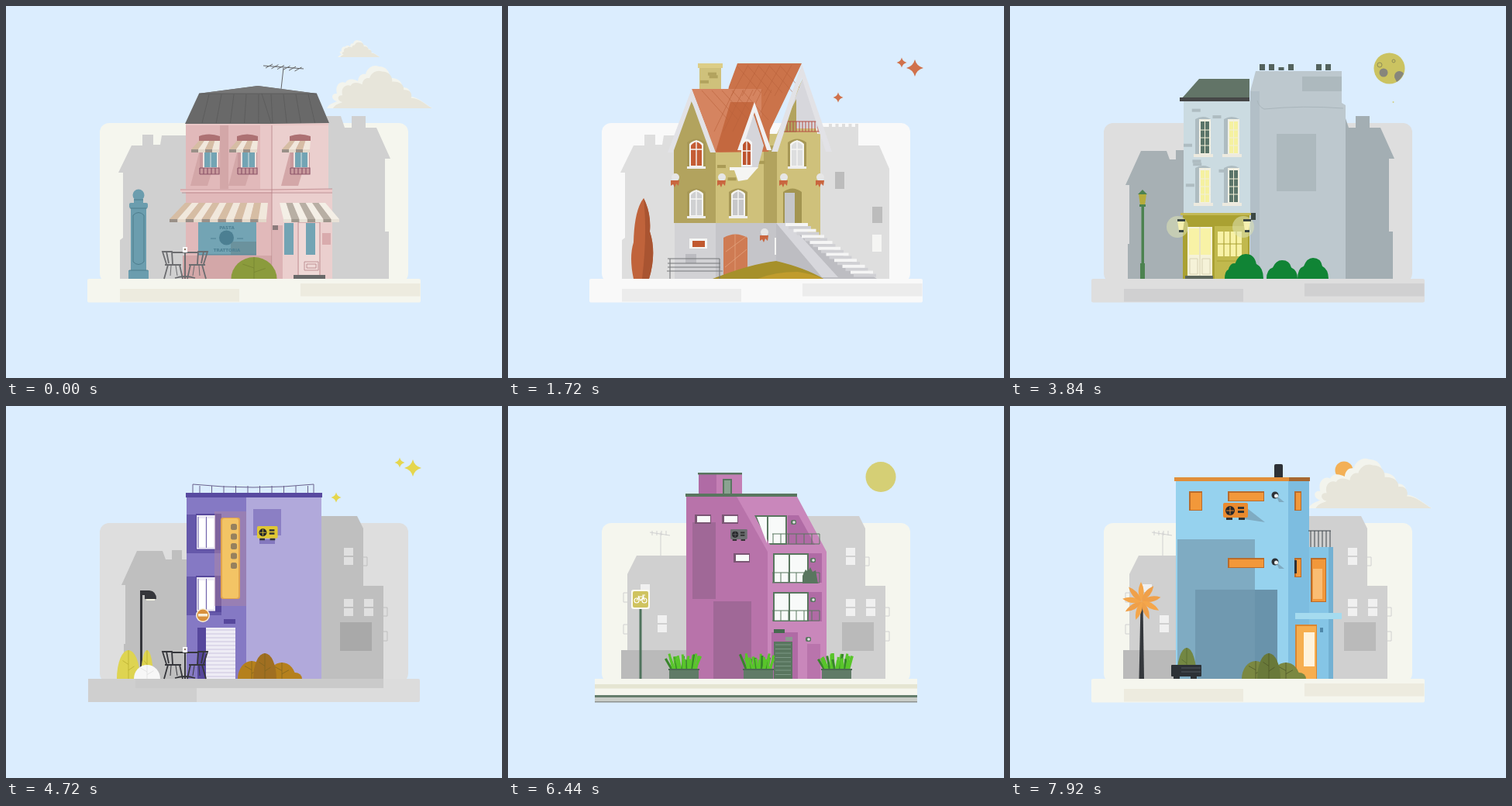
An HTML page for the animation above (8000 ms loop, 640 by 480 pixels).

```html
<!DOCTYPE html>
<html lang="en">
<head>
<meta charset="utf-8">
<title>Little houses</title>
<style>
html, body { margin: 0; width: 100%; height: 100%; overflow: hidden; background: #dbedfe; }
svg { display: block; width: 100%; height: 100%; }
text { font: bold 5.5px "DejaVu Sans", sans-serif; text-anchor: middle; }
</style>
</head>
<body>
<svg id="stage" viewBox="0 0 640 480"></svg>
<script>
const LOOP = 8000, HOLD = 1500, FIRST_CUT = 1550, FLOOR = 352;

// shapes
const R = (f, x, y, w, h, r = 0) => `<rect x="${x}" y="${y}" width="${w}" height="${h}" rx="${r}" fill="${f}"/>`;
const D = (f, d) => `<path fill="${f}" d="${d}"/>`;
const L = (c, w, d) => `<path fill="none" stroke="${c}" stroke-width="${w}" d="${d}"/>`;
const C = (f, x, y, r) => `<circle fill="${f}" cx="${x}" cy="${y}" r="${r}"/>`;
const T = (t, s) => `<g transform="${t}">${s}</g>`;
const stand = (f, x, w, y) => R(f, x, y, w, FLOOR - y);

// repetition
const rep = (n, fn) => Array.from({ length: n }, (_, i) => fn(i)).join('');
const each = (list, fn) => list.map(fn).join('');
const grid = (nx, ny, x, y, dx, dy, fn) => rep(nx, i => rep(ny, j => fn(x + i * dx, y + j * dy)));
const bars = (n, x, dx, y, h) => rep(n, i => `M${x + i * dx} ${y}v${h}`);
const rows = (n, y, dy, x, w) => rep(n, i => `M${x} ${y + i * dy}h${w}`);
const mirror = (x, s) => s + T(`translate(${2 * x} 0) scale(-1 1)`, s);
function seeded(seed) {
  return () => (seed = seed * 16807 % 2147483647) / 2147483647;
}
function bricks(f, seed, n, x, y, w, h) {
  const rnd = seeded(seed);
  return rep(n, () => R(f, x + rnd() * (w - 11), y + rnd() * (h - 4), 11, 4));
}

// scenery
const panel = f => R(f, 121, 151, 398, 206, 12);
const ground = (f, block) => R(f, 105, FLOOR, 430, 30.5, 2) + R(block, 147, 365, 154, 16.5) + R(block, 380, 358, 154.5, 16.5);
const leftGables = f => D(f, 'M147 352v-50l4-3v-84h-6l17-35h14v-14h14v13h9l2-12h35v185Z');
const leftRoof = f => D(f, 'M152 352v-45h2v-76h-5l20-44h33l4 11h8v-12h13v12h9v154Z');
const rightGables = f => D(f, 'M408 352v-210h24l5 15h9v-15h18v15h14l18 40h-7v94h5v61Z');
const flats = (wall, light, dark, left) => D(wall, 'M385 352v-210h68l8 16v74h26v120Z') + R(dark, 431, 279, 41, 37)
  + grid(1, 2, 436, 183, 0, 12, (x, y) => R(light, x, y, 12, 10)) + grid(2, 2, 436, 249, 26, 12, (x, y) => R(light, x, y, 12, 10))
  + L(wall, 1, 'M461 195h5v11h-5M487 260h5v11h-5M487 291h5v12h-5')
  + (left ? D(wall, 'M146 352l8-37v-98l12-24h69v159Z') + stand(dark, 146, 84, 315) + R(light, 171, 230, 12, 10)
    + grid(1, 2, 193, 270, 0, 12, (x, y) => R(light, x, y, 12, 10)) + L(wall, 1, 'M154 241h-5v12h5M154 282h-5v12h5M197 193v-30M183 163l26 4' + bars(4, 186, 6, 161, 6)) : '');

function cloud(x, y, s) {
  const puff = 'M0 0C3-6 9-7 13-9C5-11 5-20 13-19C10-29 17-36 24-33C28-40 36-37 40-35C41-43 46-45 50-44C52-52 60-57 67-54C78-54 82-45 81-39C91-40 98-34 97-27C107-28 109-20 107-15C116-16 128-5 136 0Z';
  return T(`translate(${x} ${y}) scale(${s})`, D('#f3f4ed', puff) + T('translate(8 0) scale(.94 .88)', D('#e7e5da', puff)));
}
const star = (f, x, y, r) => D(f, `M${x} ${y - r}q${r * .2} ${r * .8} ${r} ${r}q${-r * .8} ${r * .2} ${-r} ${r}q${-r * .2} ${-r * .8} ${-r} ${-r}q${r * .8} ${-r * .2} ${r} ${-r}Z`);
const stars = f => star(f, 525, 80, 11) + star(f, 508, 73, 6.5) + star(f, 426, 118, 6.5);

// plants and props
const dome = (f, x, w, h) => D(f, `M${x - w} ${FLOOR}a${w} ${h} 0 0 1 ${2 * w} 0Z`);
const leafy = (f, vein, x, w, h) => dome(f, x, w, h) + L(vein, .7, `M${x} ${FLOOR}v${-h}M${x} ${FLOOR - h * .3}l${w / 2} -5M${x} ${FLOOR - h * .5}l${-w / 2} -5`);
const shrubs = (f, tall, vein) => leafy(f, vein, 317, 18, 23) + dome(f, 373, 9, 8) + leafy(f, vein, 356, 18, 21) + leafy(tall, vein, 334, 15, 33);
const cafe = c => mirror(231, L(c, 1.8, 'M207 333l-5-16h12l1 16M207 317l3 15M205 334h21M209 334l-5 18M224 334l4 18') + L(c, 1, 'M213 335l-1 13M219 335l2 13'))
  + R(c, 215, 317, 32, 2) + stand(c, 230, 2, 318) + L(c, 1.8, 'M218 351q13-4 26 0') + R('#fff', 228, 311, 6, 7) + C('#876', 231, 314, 1.2);
const aircon = (x, y, s, f) => T(`translate(${x} ${y}) scale(${s})`, R(f, 0, 0, 32, 19, 2) + C('#26272a', 9, 10, 6) + L(f, 1, 'M9 5v10M4 10h10')
  + grid(1, 2, 19, 5, 0, 5, (a, b) => R('#333', a, b, 8, 3)) + grid(2, 1, 4, 19, 16, 0, (a, b) => R('#333', a, b, 8, 3)));

// striped canopy: top edge a..b at y, bottom edge c..d at z, with a hanging valance
const awning = (a, b, y, c, d, z, n, slope, edge) => rep(n, i => {
  const mix = (p, q, k) => p + (q - p) * k / n;
  const l = mix(c, d, i), r = mix(c, d, i + 1);
  return D(slope[i % 2], `M${mix(a, b, i)} ${y}H${mix(a, b, i + 1)}L${r} ${z}H${l}Z`) + R(edge[i % 2], l, z, r - l, 4);
});

function pinkShop() {
  const shade = '#d3a7a8', line = '#b58287', glass = '#73a4b4', ink = '#4c7f92', teal = '#6b9dae';
  const stripe = ['#d6bda4', '#f1e8dc'], edge = ['#9a9088', '#e4d8ca'];
  const upper = x => D('#ad7173', `M${x - 1} 174v-6q13-5 27 0v6Z`) + R('#c99a9d', x, 174, 25, 43) + R('#efe3e0', x + 4, 187, 20, 22)
    + R(glass, x + 6, 188, 16, 20) + L('#dce3e3', 1, `M${x + 14} 188v20`) + L('#8d5569', 1.2, `M${x} 209h25v8h-25` + bars(5, x, 5, 209, 8))
    + awning(x - 1, x + 26, 174, x - 11, x + 25, 185, 4, stripe, edge);
  return panel('#f5f6ee') + leftGables('#d0d0d0') + rightGables('#d0d0d0') + ground('#f5f6ee', '#edebdf')
    + cloud(414, 132, 1) + T('translate(0 39)', cloud(428, 27, .4))
    + stand('#e1b9ba', 232, 111, 151) + stand('#ebcfce', 343, 73, 151) + stand('#ebcfce', 343, 78, 239) + R(shade, 276, 152, 11, 84) + R('#e9c8c8', 328, 152, 15, 84)
    + each([250, 299, 367], x => D(shade, `M${x} 186l-12 46h22l14-46Z`)) + stand(shade, 228, 115, 322) + stand('#dcb3b5', 344, 13, 283) + R('#d9abad', 408, 293, 11, 15) + R('#8b7a7b', 344, 283, 7, 6)
    + R('#ecc9c9', 225, 236, 196, 4) + L(line, .8, 'M225 237h118l78-1M227 241h194M343 152v200')
    + D('#696969', 'M231 152l18-39l76-10l76 10l16 38l-75 1Z') + D('#767676', 'M249 113l76-10l76 10Z') + L('#585858', .7, 'M249 113h152M330 113l12 38' + rep(9, i => `M${262 + i * 16} 114l${i * 2.2 - 9} 37`)) + L('#e9c7c6', 2, 'M232 153h184')
    + L('#666', 1, 'M355 107l3-27M332 77l52 4' + rep(6, i => `M${335 + i * 7.5} ${80 + i * .8}l9-5`))
    + each([250, 299, 367], upper)
    + R(glass, 248, 279, 75, 42) + R('#6b929d', 290, 304, 33, 17) + C(ink, 284.5, 299, 9.5) + L(ink, 1, 'M264 300h7M298 300h8M248 321h75')
    + `<g fill="${ink}"><text x="285" y="288">PASTA</text><text x="285" y="317">TRATTORIA</text></g>`
    + stand('#efd9d7', 378, 26, 280) + grid(2, 1, 359, 280, 28, 0, (x, y) => R(glass, x, y, 12, 41)) + L(line, .8, 'M377 352v-73h28v73M385 330h18v11h-18zM388 333h12v5h-12z') + stand('#696969', 371, 41, 347)
    + awning(231, 338, 254, 211, 336, 275, 12, stripe, edge) + awning(353, 412, 254, 358, 430, 275, 7, ['#f4efe6', '#b8afa4'], ['#e8e2d7', '#9f978d'])
    + C(teal, 171, 244, 7.5) + R(teal, 165, 249, 12, 5) + R(teal, 159, 254, 24, 7, 2) + stand(teal, 161, 20, 260) + stand(teal, 158, 26, 341) + L('#467485', .8, 'M164 270q7-7 14 0v60q-7 7-14 0zM160 261h22M159 341h24M165 250h12')
    + leafy('#8b9b3c', '#748130', 320, 29.5, 28) + cafe('#6c6d70');
}

function yellowHouse() {
  const wall = '#cfc17b', shade = '#b2a35e', roof = '#cb734a', trim = '#e2e2e6', white = '#f5f5f3';
  const arched = (f, x, y, w, h) => D(f, `M${x} ${y + h}v${5 - h}q${w / 2} -9 ${w} 0v${h - 5}Z`);
  const sash = (f, x, y) => arched('#a79856', x - 3, y - 2, 24, 36) + arched(white, x, y, 18, 35) + arched(f, x + 2, y + 2, 14, 31) + L(white, 1.4, `M${x + 9} ${y}v34M${x} ${y + 12}h18`) + R('#eee', x - 3, y + 34, 24, 3);
  const gable = (f, x, y, w, h, t) => D(f, `M${x} ${y}l${w} ${h}h${-t}L${x} ${y + t * 2.2}L${x - w + t} ${y + h}h${-t}Z`);
  const basket = (x, y) => C('#e6e6e6', x, y, 5) + D('#c9663f', `M${x - 6} ${y + 4}h11l-1 7l-3-3l-2 5l-2-4l-3 2Z`);
  return panel('#f9f9f9') + leftGables('#dedede') + D('#dedede', 'M400 352v-196h14v24h65l13 30v142Z') + R('#dedede', 414, 156, 38, 30) + L('#dedede', 4, bars(5, 416, 8.5, 152, 6))
    + R('#bcbcbc', 422, 214, 12, 22) + R('#bcbcbc', 470, 259, 13, 21) + R(white, 470, 295, 12, 22) + ground('#f9f9f9', '#ececec') + stars('#d0714b')
    + R(wall, 247, 76, 28, 36) + R('#dccd87', 245, 74, 32, 6) + bricks(shade, 5, 3, 248, 84, 26, 22)
    + D(shade, 'M214 280v-98l21-62l33 62v98Z') + stand(wall, 268, 135, 165) + D(wall, 'M340 180l41-88l22 88Z') + R(shade, 330, 180, 17, 100) + bricks('#aa9b55', 9, 5, 270, 192, 130, 75)
    + stand('#d2d2d5', 215, 53, 280) + stand('#c5c5c9', 268, 78, 280) + R('#bbbbc0', 229, 320, 14, 12)
    + D(roof, 'M296 74h83l-41 86l-2 28l-68 1l17-85Z') + D('#d58460', 'M237 107h90v36l-10-18l-21 59l-28 5Z') + D('#c4683f', 'M287 124h30l-21 64h-28Z')
    + L('#b9623c', .6, rep(5, i => `M${250 + i * 13} 109l34 38M${296 + i * 14} 78l30 34M${292 + i * 12} 108l-26 54M${310 + i * 14} 76l-22 40`))
    + D('#d7d7dc', 'M380 94l22 64h-47Z') + D(shade, 'M358 147l14-27v43h-18Z') + L('#b64c42', 1, 'M355 149h47M355 162h47' + bars(12, 356, 4, 149, 13))
    + gable(trim, 237, 107, 31, 82, 7) + gable(trim, 379, 75, 39, 113, 8)
    + stand('#d5d5da', 0, 0, FLOOR) + D('#d5d5da', 'M317 140l-16 43v27h21l8-30Z') + gable('#f0f0f2', 318, 124, 22, 62, 6) + D(white, 'M286 208h37l-14 16l-12 2l-5-14h-6Z')
    + arched('#f5f5f5', 301, 171, 14, 36) + arched('#bd532e', 303, 174, 10, 31) + L(white, 1.3, 'M308 172v34M302 187h12')
    + sash('#c55d35', 234, 173) + sash('#cfd0d2', 234, 237) + sash('#c6c6c8', 288, 237) + sash('#dddedf', 364, 173) + arched('#a39551', 355, 235, 24, 45) + R('#c5c6c9', 357, 241, 13, 39)
    + R(white, 234, 300, 23, 13) + R('#c1592f', 238, 303, 16, 8) + R(white, 344, 299, 11, 22) + R('#c1592f', 347, 302, 6, 17)
    + arched('#cf7b53', 278, 294, 31, 58) + L('#e2a47f', .8, 'M281 317l27-20M280 337l28-23M293 294v58') + each([216, 276, 356, 403], x => basket(x, 221)) + basket(331, 292)
    + D('#bdbdc2', 'M346 280h24l106 72H346Z') + D('#d7d7dc', 'M346 280h16l64 70h-21Z') + rep(9, i => R('#f5f5f5', 358 + i * 10.5, 280 + i * 7.7, 29, 4) + R('#d0d0d4', 362 + i * 10.5, 284 + i * 7.7, 29, 4))
    + D('#a6902a', 'M264 352q48-19 82-23q38 9 61 23Z') + D('#c09c2d', 'M322 352q22-9 52-9q20 3 33 9Z')
    + D('#c0633b', 'M162 352q-6-28 0-47q1-42 13-57q10 19 8 43q9 28-1 61Z') + D('#a95431', 'M175 248q10 20 8 43q9 28-1 61h-9q7-58 2-104')
    + L('#77787b', 1.1, rows(4, 326, 5, 206, 68) + mirror && 'M206 326h67M206 332h68M206 337h68M205 342h72' + bars(2, 209, 64, 326, 26));
}

function nightPub() {
  const dim = '#5a7469', lit = '#f5f1a0', stone = '#aebcc1', green = '#4c8250', gold = '#aaa132', iron = '#3b4744';
  const sash = (f, x, y) => D(stone, `M${x - 5} ${y + 46}v-46q10-6 20 0v46Z`) + R('#f1f0e4', x, y, 15, 46) + R(f, x + 2, y + 3, 11, 41)
    + L('#f2efd8', 1, `M${x + 7.5} ${y}v45` + rows(3, y + 14, 10, x, 15)) + R('#edeadf', x - 7, y + 45, 25, 4);
  const lamp = x => `<g opacity=".55">${C('#dfe3b5', x, 285, 14)}</g>` + D('#f6f0b0', `M${x} 277h9l-2 13h-5Z`) + R(iron, x, 275, 10, 3) + R(iron, x + 2, 289, 6, 3);
  const bush = (x, w, h) => D('#108435', `M${x - w} 352q0-${h * .5} ${w * .4}-${h * .6}q${w * .2}-${h * .4} ${w * .6}-${h * .4}q${w * .5} 0 ${w * .6} ${h * .4}q${w * .4} ${h * .15} ${w * .4} ${h * .6}Z`);
  return panel('#dedede') + leftRoof('#a7b0b4') + rightGables('#a3aeb3') + ground('#dedede', '#d0d0d1')
    + C('#cbc361', 489.5, 80.5, 20) + C('#87867b', 482, 86, 5.5) + D('#87867b', 'M497 94a6 6 0 0 1 11-7q-3 7-9 11Z') + L('#8f8c57', 1, 'M474 76a3 3 0 1 0 6 0a3 3 0 1 0-6 0M493 71a2 2 0 1 0 4 0a2 2 0 1 0-4 0') + C('#d2ce83', 494.5, 124, 1)
    + stand('#cbdbe1', 224, 87, 121) + bricks(stone, 3, 8, 224, 128, 87, 130) + D('#bdc8ce', 'M310 352V110l7-26h111v41l5 3v224Z') + stand('#b2bfc7', 310, 12, 110) + R('#adb9be', 377, 91, 51, 19) + R('#adb9be', 344, 165, 51, 74)
    + L('#a9b5bb', 1, 'M319 122q2 8 9 11q50-5 102-1') + L('#53625d', 7, bars(2, 325.5, 12, 75, 8) + bars(1, 362.5, 0, 75, 8) + bars(2, 398.5, 12, 75, 8) + bars(1, 350, 0, 79, 4))
    + D('#627467', 'M221 120l23-26h65v26Z') + R('#464747', 219, 118, 90, 5)
    + sash(dim, 244, 146) + sash(lit, 281, 146) + sash(lit, 244, 209) + sash(dim, 281, 209)
    + stand(gold, 223, 86, 267) + R('#c3b956', 220, 267, 91, 3) + stand('#c1b94d', 264, 43, 284) + stand('#f5f2d8', 229, 32, 285) + grid(2, 1, 231, 287, 15, 0, (x, y) => R('#f8f2a6', x, y, 13, 34))
    + L('#d8d2b4', 1, 'M245 285v65M232 326h10v20h-10zM248 326h10v20h-10z') + R('#f8f2a6', 268, 291, 31, 32) + L(gold, 1.1, bars(3, 276, 8, 291, 32) + 'M268 307h31M267 329h35v20') + stand('#5c665c', 226, 36, 348)
    + lamp(216) + lamp(301) + R(iron, 311, 267, 6, 9) + bush(289, 12, 20) + bush(304, 23, 32) + bush(351, 20, 24) + bush(391, 20, 27)
    + stand(green, 169.5, 3.5, 258) + stand(green, 168, 6, 332) + D('#b6ac3b', 'M166 243h10l-2 14h-6Z') + D(green, 'M165 243l6-6l6 6Z') + R(green, 167, 256, 8, 3);
}

function purpleHouse() {
  const deep = '#56479c', yellow = '#ded451', iron = '#35363b';
  const windows = y => R('#6558aa', 233, y - 1, 45, 50) + R(deep, 245, y - 2, 33, 47) + R('#ece9f4', 246, y, 24, 44) + grid(2, 1, 249, y + 4, 11, 0, (x, v) => R('#fff', x, v, 8, 37)) + L(deep, .8, `M248 ${y + 2}v40M258.500 ${y + 2}v40M246 ${y + 44}h24`);
  return panel('#dedede') + leftRoof('#bfbfbf') + flats('#bfbfbf', '#e0e0e0', '#a9a9a9') + R('#dcdcdc', 106, FLOOR, 428, 30, 2) + R('#cfcfcf', 106, FLOOR, 140, 30) + R('#cacaca', 167, FLOOR, 320, 12) + stars('#e5d64d')
    + stand('#8579c4', 233, 77, 116) + stand('#b1a9db', 310, 97, 116) + R('#584aa0', 232, 112, 176, 6) + L('#6a638d', 1, 'M241 112v-11q78 8 156 0v11' + bars(10, 250, 15.5, 103, 9))
    + windows(141) + windows(221)
    + `<g opacity=".45">${R('#b0869f', 269, 136, 41, 122)}</g>` + R('#e1a44e', 277, 144, 25, 105, 3) + R('#f3c465', 279, 145, 21, 103, 3) + grid(1, 5, 290, 152, 0, 12.5, (x, y) => R('#96815e', x, y, 8, 8, 2.5))
    + R('#8b7fc4', 319, 133, 36, 34) + R('#8478bf', 327, 172, 20, 6) + aircon(324, 155, .83, '#e0c734')
    + C('#f8efd8', 254, 270, 9) + C('#d8903c', 254, 270, 7.5) + R('#f8efd8', 248, 268, 12, 3.5) + R(deep, 281, 275, 15, 6)
    + stand(deep, 247, 11, 286) + stand('#eeecf5', 258, 38, 286) + L('#cbc4df', 1, rows(13, 289, 5, 258, 38)) + shrubs('#b5801c', '#a06f21', '#7b6420')
    + stand(iron, 173, 3, 239) + D(iron, 'M173 238h12q9 1 9 11h-15v-5h-6Z') + R('#f4f4e5', 181, 249, 11, 2)
    + leafy(yellow, '#b7a92d', 158, 15, 37) + leafy(yellow, '#b7a92d', 182, 8, 37) + leafy('#f7f7f7', '#ddd', 182, 17, 18) + cafe(iron);
}

function magentaHouse() {
  const green = '#59765f', white = '#f8faf9', shade = '#a06897', mid = '#b06ba5';
  const floor = y => R(mid, 388, y, 17, 38) + R(green, 342, y, 46, 38) + R(white, 344, y + 2, 18, 35) + R(white, 364, y + 2, 22, 35);
  const rail = y => L(green, 1, rows(2, y, 13, 341, 61) + bars(7, 342, 10, y, 13));
  const spot = (x, y) => R(green, x - 4, y - 3, 7, 6, 2) + C('#e4e6e7', x, y, 1.8);
  const slit = (x, y) => R('#7b5674', x - 2, y - 1, 21, 12) + R(white, x + 1, y + 1, 17, 8);
  function planter(x) {
    const rnd = seeded(x);
    return rep(20, i => {
      const foot = x + 5 + i * 1.6, lean = (i - 9.5) * .6 + rnd() * 6 - 3;
      return L(i % 4 ? '#58c52a' : '#37862a', 3, `M${foot} 341l${lean} ${-13 - rnd() * 9}`);
    }) + stand('#607b67', x + 1, 38, 339) + R('#4c6853', x, 339, 40, 2);
  }
  return panel('#f5f6ee') + flats('#d0d0d0', '#f0f0f0', '#bababa', true) + R('#f5f6ee', 112, FLOOR, 416, 30) + R('#e5e5d2', 112, 359, 416, 5.5) + R('#657e6d', 112, 373, 416, 3) + R('#c9cdc8', 112, 376, 416, 6) + R('#8d918f', 112, 381, 416, 1.5)
    + C('#d5cf75', 481, 91.5, 19.5)
    + stand('#b873aa', 230, 105, 115) + D('#c987bb', 'M294 115h78l39 73v164h-76V188Z') + R(mid, 246, 87, 23, 27) + R('#c47fb5', 269, 87, 33, 27) + R(green, 245, 86, 57, 2.5) + R(green, 277, 94, 12, 20) + R('#8aa391', 279, 96, 8, 18) + R(green, 229, 113, 144, 4)
    + R(shade, 238, 150, 30, 99) + stand(shade, 265, 49, 252) + slit(243, 141) + slit(278, 141) + slit(293, 191) + aircon(287, 159, .68, '#6d7072')
    + D(green, 'M318 141h42v38h-22Z') + D(white, 'M321 143h13v34ZM336 143h22v34h-22Z') + D(mid, 'M361 141h14l21 38h-35Z')
    + floor(190) + floor(240) + each([165, 215, 264], rail) + spot(369, 150) + spot(394, 199) + spot(394, 250) + spot(388, 301) + D(green, 'M380 229v-10l4-8l3 3l3-6l3 6l4-2l3 17Z')
    + stand(mid, 340, 34, 292) + stand(green, 343, 24, 304) + L('#7c9885', 1, rows(8, 308, 5.5, 345, 20)) + R('#466a50', 343, 288, 14, 5) + R('#8c9a91', 358, 298, 9, 5) + stand('#b974ac', 386, 17, 307)
    + each([207, 303, 404], planter)
    + stand('#4f735c', 169.5, 3, 260) + R('#fbfaf1', 159, 237, 24, 25, 3) + R('#cfc35f', 161, 239, 20, 21, 2)
    + L('#fff', 1.1, 'M163 251a3 3 0 1 0 6 0a3 3 0 1 0-6 0M173 251a3 3 0 1 0 6 0a3 3 0 1 0-6 0M166 251l3-5h6l-4 5l-3-6M176 251l-2-7h3');
}

function blueHouse() {
  const side = '#7dbde0', shade = '#7fabc2', iron = '#2d3136';
  const slot = (x, y, w, h) => R('#b96c2c', x, y, w, h) + R('#f2983a', x + 2, y + 2, w - 3, h - 3);
  return panel('#f5f6ee') + flats('#d0d0d0', '#f0f0f0', '#bababa', true) + ground('#f5f6ee', '#edebdf') + C('#f3b056', 431, 83, 11.5) + cloud(385, 132, 1.17)
    + R(iron, 341, 75, 11, 20, 2) + stand('#96d2ee', 214, 146, 95) + stand(side, 359, 27, 95) + stand('#85c5e6', 386, 31, 182) + stand('#73b1d3', 411, 6, 182) + R('#e18e39', 212, 92, 175, 5) + R('#a76830', 360, 92, 27, 5)
    + stand(shade, 216, 100, 172) + stand('#6993ab', 239, 106, 237) + stand('#7099b0', 239, 77, 237)
    + slot(231, 110, 17, 25) + each([110, 196], y => slot(281, y, 47, 13) + slot(367, y, 9, 25)) + R(iron, 367, 199, 3, 17) + D(shade, 'M306 132l23 18l-33-5Z') + aircon(275, 125, 1, '#e98a2f')
    + each([115, 201], y => D(shade, `M343 ${y}l11 9h-7Z`) + C(iron, 342, y, 4.5) + C('#e8eef0', 343.5, y + 1, 2.5))
    + L('#3f464d', 1, 'M385 161h29' + bars(6, 388, 5, 161, 21)) + slot(388, 196, 20, 57) + R('#fabd73', 391, 210, 12, 39) + R('#a5dbef', 368, 267, 60, 8)
    + stand('#d98632', 368, 28, 282) + stand('#f6ae50', 370, 25, 284) + R('#fff3dd', 379, 292, 14, 44) + R('#4f88aa', 400, 286, 4, 6) + shrubs('#7b8841', '#69793a', '#4b5426')
    + leafy('#738743', '#52652f', 228, 13, 40) + R('#dbedfe', 0, 0, 0, 0) + R('#7fabc2', 216, 349, 26, 3) + R(iron, 208, 334, 39, 15, 1) + grid(2, 1, 211, 348, 22, 0, (x, y) => R(iron, x, y, 8, 4)) + L('#535960', 1, rows(2, 338, 5, 221, 25))
    + D('#35383c', 'M168.500 256h3l1.500 96h-6.500Z') + rep(9, i => T(`translate(170 252) rotate(${i * 40 - 10})`, D(i % 2 ? '#f4a64b' : '#efa04a', 'M0 0q11-8 25-1q-12 7-25 1Z')));
}

const stage = document.getElementById('stage');
stage.innerHTML = R('#dbedfe', 0, 0, 640, 480) + each([pinkShop, yellowHouse, nightPub, purpleHouse, magentaHouse, blueHouse], draw => `<g>${draw()}</g>`);
const scenes = stage.querySelectorAll(':scope > g');

function render(t) {
  const now = t < FIRST_CUT ? 0 : 1 + Math.floor((t - FIRST_CUT) / HOLD);
  scenes.forEach((s, i) => s.style.display = i === now ? '' : 'none');
}

const start = performance.now();
function tick() {
  render((performance.now() - start) % LOOP);
  requestAnimationFrame(tick);
}
tick();
</script>
</body>
</html>
```
